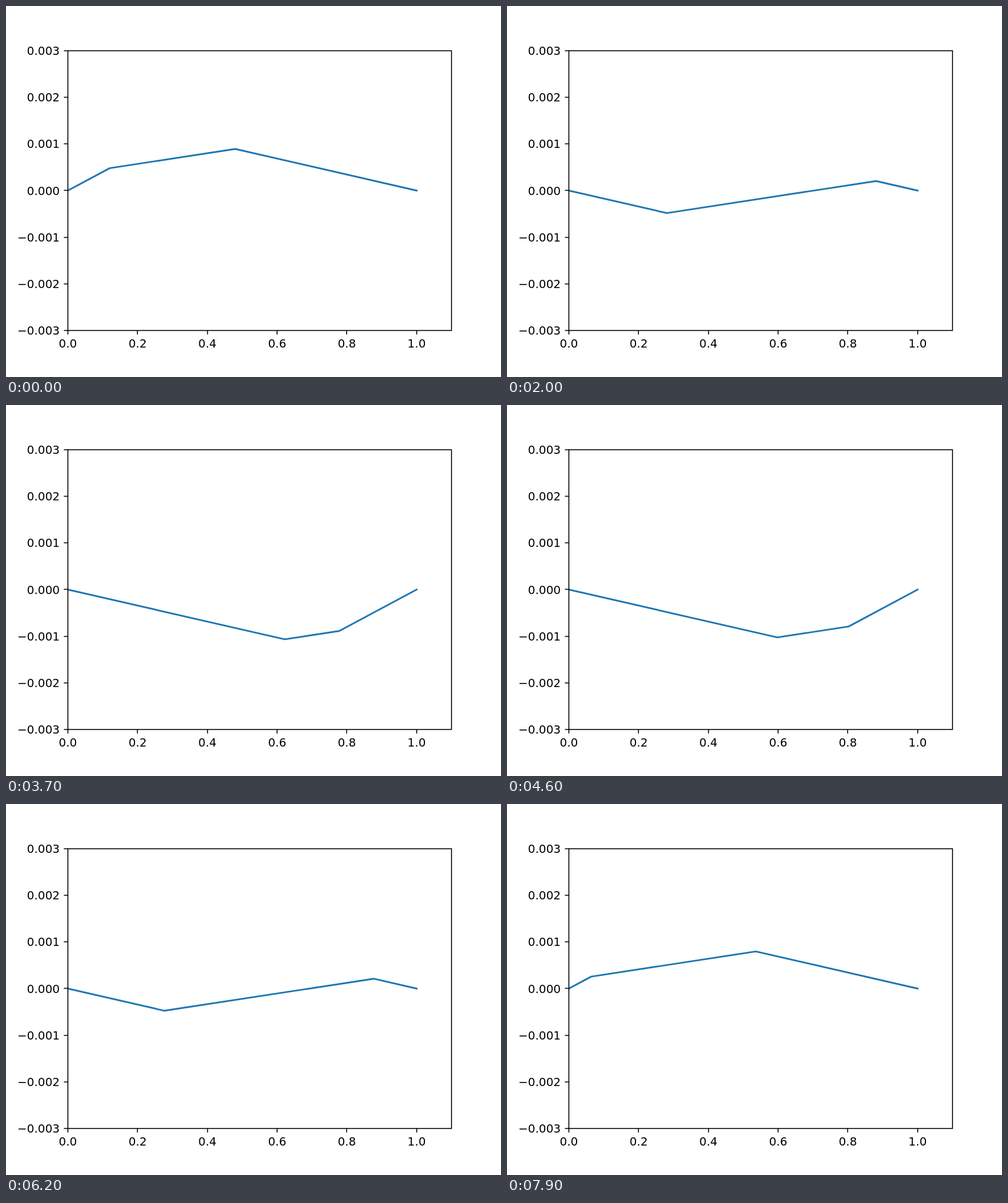
Animation of 840x630 px, one loop 8000 ms. Source, as an HTML page:

```html
<!DOCTYPE html>
<html lang="en">
<head>
<meta charset="utf-8">
<title>Plucked string</title>
<style>
  html, body { margin: 0; width: 100%; height: 100%; overflow: hidden; background: #fff; }
  svg { display: block; width: 840px; height: 630px; }
  text { font: 19.44px "DejaVu Sans", sans-serif; fill: #000; }
  .axis { fill: none; stroke: #000; stroke-width: 1.556; }
  .string { fill: none; stroke: #1f77b4; stroke-width: 2.917; stroke-linecap: square; stroke-linejoin: round; }
</style>
</head>
<body>
<svg viewBox="0 0 840 630">
  <clipPath id="plot"><rect x="105" y="75.6" width="651" height="475.65"/></clipPath>
  <path class="string" id="string" clip-path="url(#plot)"/>
  <path class="axis" id="ticks"/>
  <rect class="axis" x="105" y="76" width="651" height="475"/>
  <g id="labels"></g>
</svg>
<script>
const BOX = { left: 105, right: 756, top: 75.6, bottom: 551.25 };
const X_MAX = 1.1, Y_MAX = 0.003;
const TICK = 6.8;

// The string is pulled to HEIGHT at PLUCK, then released.
const PLUCK = 0.3, HEIGHT = 0.0012;
const START = 0.18, SPEED = 0.02005;
const STEP_MS = 100, STEPS = 80;

const $ = id => document.getElementById(id);
const px = x => BOX.left + x / X_MAX * (BOX.right - BOX.left);
const py = y => (BOX.top + BOX.bottom) / 2 - y / Y_MAX * (BOX.bottom - BOX.top) / 2;

function addLabel(text, x, y, anchor) {
  const el = document.createElementNS("http://www.w3.org/2000/svg", "text");
  el.setAttribute("x", x);
  el.setAttribute("y", y);
  el.setAttribute("text-anchor", anchor);
  el.textContent = text;
  $("labels").append(el);
}

function drawAxes() {
  let d = "";
  for (let i = 0; i <= 5; i++) {
    const x = px(i / 5);
    d += `M${Math.round(x)} 551v${TICK}`;
    addLabel((i / 5).toFixed(1), x, 580, "middle");
  }
  for (let i = -3; i <= 3; i++) {
    const y = py(i / 1000);
    d += `M105 ${Math.round(y)}h${-TICK}`;
    const text = (i < 0 ? "\u2212" : "") + Math.abs(i / 1000).toFixed(3);
    addLabel(text, 91.2, Math.round(y + 7.2), "end");
  }
  $("ticks").setAttribute("d", d);
}

const wrap = u => ((u % 2) + 2) % 2;

// Reflects a travelling position back into the string's length.
const fold = u => 1 - Math.abs(1 - wrap(u));

// Initial shape, extended as an odd function of period 2.
function shape(u) {
  const w = wrap(u), x = w > 1 ? 2 - w : w;
  const y = HEIGHT * (x < PLUCK ? x / PLUCK : (1 - x) / (1 - PLUCK));
  return w > 1 ? -y : y;
}

function drawString(step) {
  const shift = START + SPEED * step;
  const kinks = [fold(PLUCK - shift), fold(PLUCK + shift)].sort((a, b) => a - b);
  const points = [0, ...kinks, 1].map(x => {
    const y = (shape(x - shift) + shape(x + shift)) / 2;
    return px(x).toFixed(2) + " " + py(y).toFixed(2);
  });
  $("string").setAttribute("d", "M" + points.join("L"));
}

const begin = performance.now();
function tick() {
  const elapsed = performance.now() - begin;
  drawString(Math.floor(elapsed / STEP_MS) % STEPS);
  requestAnimationFrame(tick);
}

drawAxes();
tick();
</script>
</body>
</html>
```
